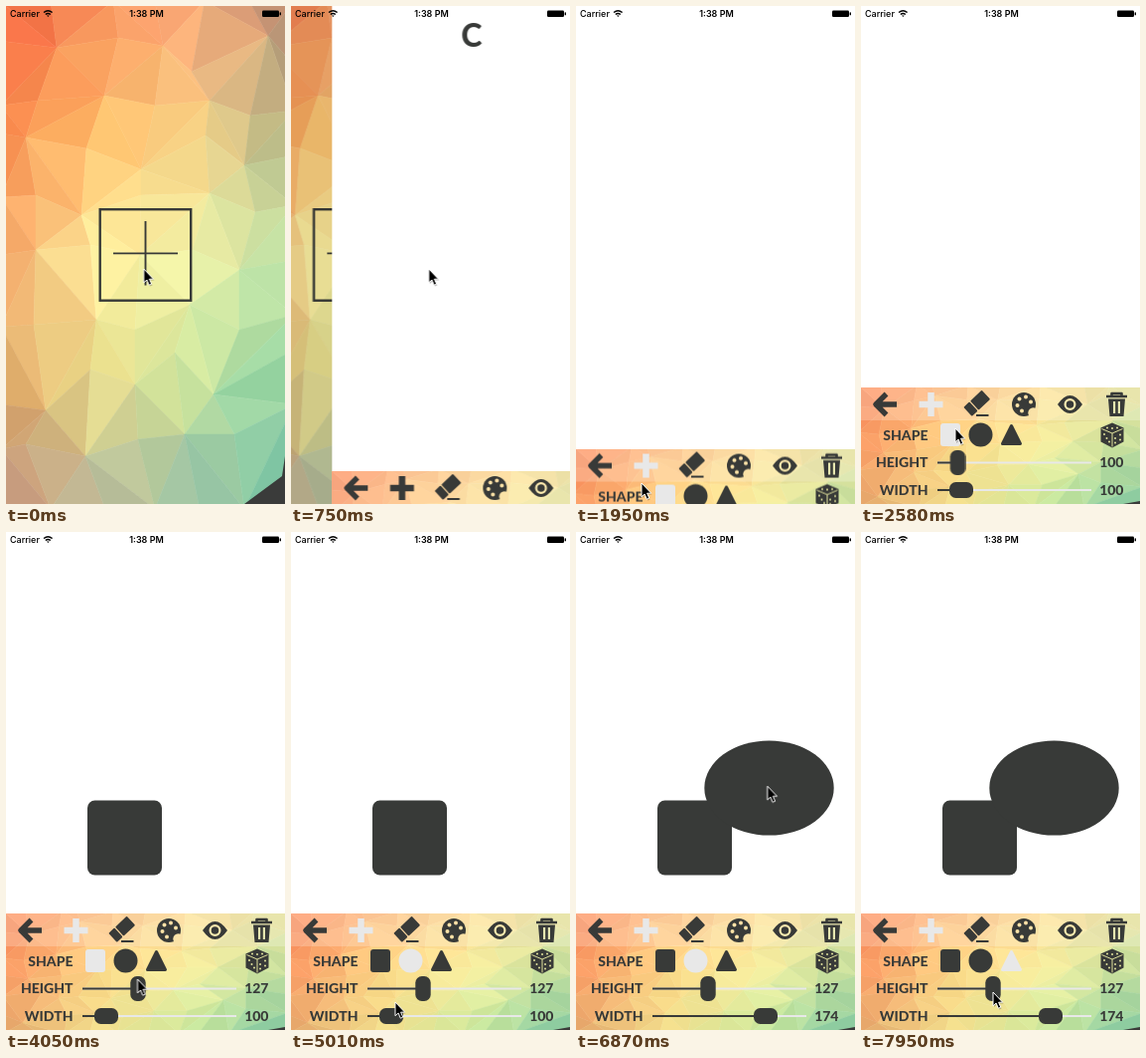
Animation, 281 px wide and 500 px high, one loop 8000 ms. Source, as an HTML page:

```html
<!DOCTYPE html>
<html lang="en">
<head>
<meta charset="utf-8">
<title>Shape editor</title>
<style>
@property --height { syntax: "<integer>"; inherits: true; initial-value: 100; }
@property --width { syntax: "<integer>"; inherits: true; initial-value: 100; }

:root { --ink: #383a38; --pale: #e8e8e8; }
html, body { margin: 0; width: 100%; height: 100%; overflow: hidden; background: #fff; }
#stage { position: relative; width: 281px; height: 500px; overflow: hidden; }
.layer { position: absolute; left: 0; top: 0; width: 281px; height: 500px; }
svg { display: block; position: absolute; left: 0; top: 0; overflow: hidden; }
#editor { background: #fff; }
#panel { top: 383px; height: 117px; }
#home::after { content: ""; position: absolute; inset: 0; background: #000; opacity: 0; animation: dim 8s infinite; }

.ink { fill: var(--ink); }
.line { fill: none; stroke: var(--ink); }
.label, .count { font: 800 14px Lato, sans-serif; }
.label { fill: var(--ink); text-anchor: end; }
.count { position: absolute; right: 16.5px; line-height: 14px; color: var(--ink); }
.status { font: 500 9px Inter, sans-serif; }
#clock { font-weight: 600; text-anchor: middle; }
#heightCount { top: 68px; counter-reset: n var(--height); animation: heightCount 8s infinite; }
#widthCount { top: 96px; counter-reset: n var(--width); animation: widthCount 8s infinite; }
.count::after { content: counter(n); }

#home { animation: home 8s infinite; }
#editor { animation: editor 8s infinite; }
#panel { animation: panel 8s infinite; }
#button { animation: press 8s step-end infinite; }
#title { animation: title 8s linear infinite; }
#cursor { animation: cursor 8s ease-in-out infinite; }
#heightThumb { animation: heightThumb 8s infinite; }
#widthThumb { animation: widthThumb 8s infinite; }
#add { stroke: var(--ink); animation: add 8s step-end infinite; }
#pickSquare { animation: pickSquare 8s step-end infinite; }
#pickCircle { animation: pickCircle 8s step-end infinite; }
#pickTriangle { animation: pickTriangle 8s step-end infinite; }
#square { animation: square 8s step-end infinite; }
#oval { animation: oval 8s step-end infinite; }

/* screen push */
@keyframes home {
  0%, 7% { transform: none; animation-timing-function: cubic-bezier(.2,.65,.2,1); }
  13.25%, 100% { transform: translateX(-84px); }
}
@keyframes editor {
  0%, 7% { transform: translateX(281px); animation-timing-function: cubic-bezier(.2,.65,.2,1); }
  13.25%, 100% { transform: none; }
}
@keyframes dim {
  0%, 7% { opacity: 0; animation-timing-function: cubic-bezier(.2,.65,.2,1); }
  13.25%, 100% { opacity: .1; }
}
@keyframes press { 0% { opacity: 1; } 5.25% { opacity: .3; } 7.125%, 100% { opacity: 1; } }
@keyframes title { 0%, 17.25% { opacity: 1; } 20%, 100% { opacity: 0; } }
@keyframes panel {
  0%, 22.15% { transform: translateY(84px); animation-timing-function: ease-in-out; }
  28.4%, 100% { transform: none; }
}

/* selections and placed shapes */
@keyframes add { 0% { stroke: var(--ink); } 21.75%, 100% { stroke: var(--pale); } }
@keyframes pickSquare { 0% { fill: var(--pale); } 59.25%, 100% { fill: var(--ink); } }
@keyframes pickCircle { 0% { fill: var(--ink); } 59.25% { fill: var(--pale); } 94.5%, 100% { fill: var(--ink); } }
@keyframes pickTriangle {
  0% { fill: var(--ink); stroke: var(--ink); }
  94.5%, 100% { fill: var(--pale); stroke: var(--pale); }
}
@keyframes square { 0% { opacity: 0; } 37.875%, 100% { opacity: 1; } }
@keyframes oval { 0% { opacity: 0; } 82.875%, 100% { opacity: 1; } }

/* slider drags */
@keyframes heightThumb {
  0%, 46.125% { transform: translateX(97.5px); animation-timing-function: ease-in-out; }
  50.625%, 100% { transform: translateX(133px); }
}
@keyframes heightCount {
  0%, 46.125% { --height: 100; animation-timing-function: ease-in-out; }
  50.625%, 100% { --height: 127; }
}
@keyframes widthThumb {
  0%, 67% { transform: translateX(101px); animation-timing-function: ease-in-out; }
  72.75%, 100% { transform: translateX(191px); }
}
@keyframes widthCount {
  0%, 67% { --width: 100; animation-timing-function: ease-in-out; }
  72.75%, 100% { --width: 174; }
}
@keyframes cursor {
  0%, 13.5% { transform: translate(138.7px, 264px); }
  21%, 28.875% { transform: translate(66px, 479px); animation-timing-function: ease-in; }
  32.25% { transform: translate(94.7px, 425px); animation-timing-function: ease-out; }
  34.875%, 40.4% { transform: translate(119px, 304px); }
  45%, 46.125% { transform: translate(97px, 452px); }
  50.625%, 53.9% { transform: translate(132.5px, 449px); }
  57%, 59.25% { transform: translate(121px, 430px); }
  64.125%, 67% { transform: translate(101px, 482px); }
  72.75%, 76.25% { transform: translate(191.5px, 479px); }
  78.375%, 80% { transform: translate(152px, 269px); }
  82.875%, 85.75% { transform: translate(193px, 254px); }
  88.125%, 94.5% { transform: translate(148px, 428px); }
  99.375%, 100% { transform: translate(133px, 462px); }
}
</style>
</head>
<body>
<div id="stage">
  <div id="home" class="layer">
    <svg width="281" height="500">
      <g id="homeMesh"></g>
      <path d="M281 452L278 472L240 500H281Z" fill="#3a3b3a"/>
      <g id="button" class="line">
        <rect x="94.7" y="204.2" width="91.5" height="91.5" stroke-width="2.4"/>
        <path d="M108 248.4H173M140.5 216V280.5" stroke-width="1.9"/>
      </g>
    </svg>
  </div>

  <div id="editor" class="layer">
    <svg width="281" height="500">
      <text id="title" x="140.5" y="40.5" class="ink" text-anchor="middle" font-family="Lato, sans-serif" font-weight="800" font-size="32">C</text>
      <rect id="square" class="ink" x="82" y="269.5" width="75" height="75" rx="7.5"/>
      <ellipse id="oval" class="ink" cx="194.5" cy="257" rx="65.2" ry="47.6"/>
    </svg>
    <div id="panel" class="layer">
      <svg width="281" height="117">
        <defs>
          <mask id="paletteHoles">
            <rect x="150" width="30" height="34" fill="#fff"/>
            <circle cx="157.5" cy="18" r="2"/><circle cx="159.5" cy="11.5" r="2"/>
            <circle cx="166" cy="9.5" r="2"/><circle cx="171" cy="14.5" r="2"/>
            <circle cx="162" cy="23.5" r="2"/><circle cx="173.5" cy="25.5" r="5.2"/>
          </mask>
          <clipPath id="trackClip"><rect x="77" y="60" width="156" height="57"/></clipPath>
        </defs>
        <g id="panelMesh"></g>
        <path d="M264 117L281 114V117Z" fill="#3a3b3a"/>
        <rect width="281" height="33" fill="#fff" opacity=".22"/>

        <path class="line" stroke-width="5.4" stroke-linejoin="round" d="M25.5 6.5L15 17L25.5 27.5M16 17H36"/>
        <path id="add" fill="none" stroke-width="6.5" d="M58.5 17H82.5M70.5 5V29"/>
        <g class="ink">
          <g transform="translate(117 15.5) rotate(-43)">
            <rect x="-13" y="-6.2" width="8" height="12.4" rx="1"/>
            <rect x="-3.8" y="-6.2" width="16" height="12.4" rx="1"/>
          </g>
          <rect x="116" y="27" width="12.5" height="2"/>
          <circle cx="164" cy="17" r="12" mask="url(#paletteHoles)"/>
          <path fill-rule="evenodd" d="M198 17Q210.5 -1 223 17Q210.5 35 198 17ZM204.5 17a6 6 0 1 0 12 0a6 6 0 1 0 -12 0Z"/>
          <circle cx="210.5" cy="17" r="3.8"/>
          <path fill-rule="evenodd" d="M249 11.5H266L264.5 29H250.5ZM254 14V26H256.2V14ZM258.8 14V26H261V14Z"/>
        </g>
        <path class="line" stroke-width="2.6" stroke-linejoin="round" d="M247 9H268M252.5 9V6H262.5V9"/>

        <text class="label" x="67.5" y="52.5">SHAPE</text>
        <text class="label" x="67.5" y="80.2">HEIGHT</text>
        <text class="label" x="67.5" y="108.2">WIDTH</text>

        <rect id="pickSquare" x="80" y="36" width="20" height="23" rx="3"/>
        <circle id="pickCircle" cx="120.5" cy="47.5" r="12"/>
        <path id="pickTriangle" stroke-width="3" stroke-linejoin="round" d="M151.5 38.5L160.5 56.5H142.5Z"/>

        <path class="ink" d="M253 35.5L264.5 40.5V54.5L253 60.5L241.5 54.5V40.5Z"/>
        <g fill="none" stroke="#dfe09c">
          <path d="M242.5 41.5L253 46L263.5 41.5M253 46V59.5" stroke-width="1"/>
          <path d="M253 41h.01M248 40.6h.01M258 40.6h.01M245 47h.01M250 54.5h.01M247.5 51h.01M256 51h.01M261 47.5h.01M256 55.5h.01M261 52.5h.01" stroke-width="2" stroke-linecap="round"/>
        </g>

        <path d="M77 75.5H232M77 103H232" stroke="#e8e8e8" stroke-width="2"/>
        <g clip-path="url(#trackClip)" class="ink">
          <g id="heightThumb">
            <rect x="-160" y="74.5" width="160" height="2"/>
            <rect x="-7.7" y="63" width="15.4" height="25" rx="6.5"/>
          </g>
          <g id="widthThumb">
            <rect x="-160" y="102" width="160" height="2"/>
            <rect x="-12" y="95" width="24" height="16" rx="6.5"/>
          </g>
        </g>
      </svg>
      <span id="heightCount" class="count"></span>
      <span id="widthCount" class="count"></span>
    </div>
  </div>

  <svg class="layer" width="281" height="500">
    <text class="status" x="4" y="11">Carrier</text>
    <g fill="none" stroke="#000" stroke-width="1.4">
      <path d="M38 6.6Q42.3 2.8 46.6 6.6M39.8 8.6Q42.3 6.3 44.8 8.6"/>
      <path d="M41 9.6H43.6L42.3 11Z" fill="#000" stroke="none"/>
    </g>
    <text id="clock" class="status" x="141.5" y="11">1:38 PM</text>
    <rect x="258" y="4.5" width="17" height="6.4" rx="1.2"/>
    <rect x="275.6" y="6.3" width="1.4" height="3" rx=".6"/>
    <g id="cursor">
      <path d="M1 1.5V15L4 12.3L6.2 17.5L8.6 16.5L6.4 11.5H10.5Z" opacity=".25"/>
      <path d="M0 0V13.8L3.1 11L5.3 16.2L7.8 15.2L5.6 10.2H9.7Z" stroke="#fff" stroke-width="1"/>
    </g>
  </svg>
</div>

<script>
// Vertices of the low-poly backdrop, row by row.
const vertices = [
  "0,0 45,-5 108,-5 150,-5 200,-5 245,-5 290,-5",
  "-5,35 51,42 113,32 158,40 187,66 264,30 290,60",
  "-5,100 32,95 99,90 150,100 205,95 246,110 290,105",
  "-5,128 20,132 81,143 136,164 201,130 240,160 290,150",
  "-5,192 30,190 76,210 136,190 205,188 251,207 290,200",
  "-5,250 30,245 85,240 135,250 188,245 235,265 290,255",
  "-5,322 28,320 91,315 130,325 185,300 235,325 290,310",
  "-5,400 40,406 85,365 130,380 170,348 209,390 290,345",
  "-5,445 20,440 80,452 133,435 180,430 230,430 290,400",
  "-5,505 45,505 100,505 150,505 195,505 240,505 290,505"
].map(row => row.split(" ").map(p => p.split(",").map(Number)));

const rgb = hex => [0, 2, 4].map(i => parseInt(hex.slice(i, i + 2), 16));
const parsePalette = rows => rows.map(row => row.split(" ").map(rgb));
const clamp = (v, lo, hi) => Math.min(hi, Math.max(lo, v));
const mix = (a, b, k) => a.map((v, i) => v + (b[i] - v) * k);

function colourAt(palette, u, v) {
  const x = clamp(u, 0, .999) * (palette[0].length - 1);
  const y = clamp(v, 0, .999) * (palette.length - 1);
  const i = Math.floor(x), j = Math.floor(y);
  const across = row => mix(row[i], row[i + 1], x - i);
  return mix(across(palette[j]), across(palette[j + 1]), y - j);
}

function drawMesh(id, palette, place, width, height) {
  const group = document.getElementById(id);
  let seed = 7;
  const random = () => (seed = seed * 16807 % 2147483647) / 2147483647;
  const triangle = corners => {
    const points = corners.map(place);
    const mean = k => points.reduce((sum, p) => sum + p[k], 0) / 3;
    const light = (random() - .5) * 10;
    const colour = colourAt(palette, mean(0) / width, mean(1) / height)
      .map(c => Math.round(clamp(c + light, 0, 255)));
    const shape = document.createElementNS("http://www.w3.org/2000/svg", "polygon");
    shape.setAttribute("points", points.join(" "));
    shape.setAttribute("fill", `rgb(${colour})`);
    shape.setAttribute("stroke", `rgb(${colour})`);
    shape.setAttribute("stroke-width", ".5");
    group.append(shape);
  };
  for (let r = 0; r < vertices.length - 1; r++) {
    for (let c = 0; c < vertices[r].length - 1; c++) {
      const [a, b] = vertices[r].slice(c, c + 2);
      const [d, e] = vertices[r + 1].slice(c, c + 2);
      const halves = (r + c) % 2 ? [[a, b, d], [b, e, d]] : [[a, b, e], [a, e, d]];
      halves.forEach(triangle);
    }
  }
}

drawMesh("homeMesh", parsePalette([
  "f4633f fb9560 fba878 b98a70",
  "f7884a fdbd68 fad488 b8b888",
  "fab070 fef0a0 f4f5aa c4e6a8",
  "dfa868 ecdf8c cbe59c 8cd2a4",
  "c09078 b8b898 9cc6ac 7ac4a6"
]), p => p, 281, 500);

drawMesh("panelMesh", parsePalette([
  "f98858 fbb878 fcdc90 dcd890",
  "fb9c66 fdda88 f8f2a4 c0e0a0",
  "e2a468 f6e290 c8e89c 80c8a4"
]), ([x, y]) => [y * .562, x * .416], 281, 117);
</script>
</body>
</html>
```
